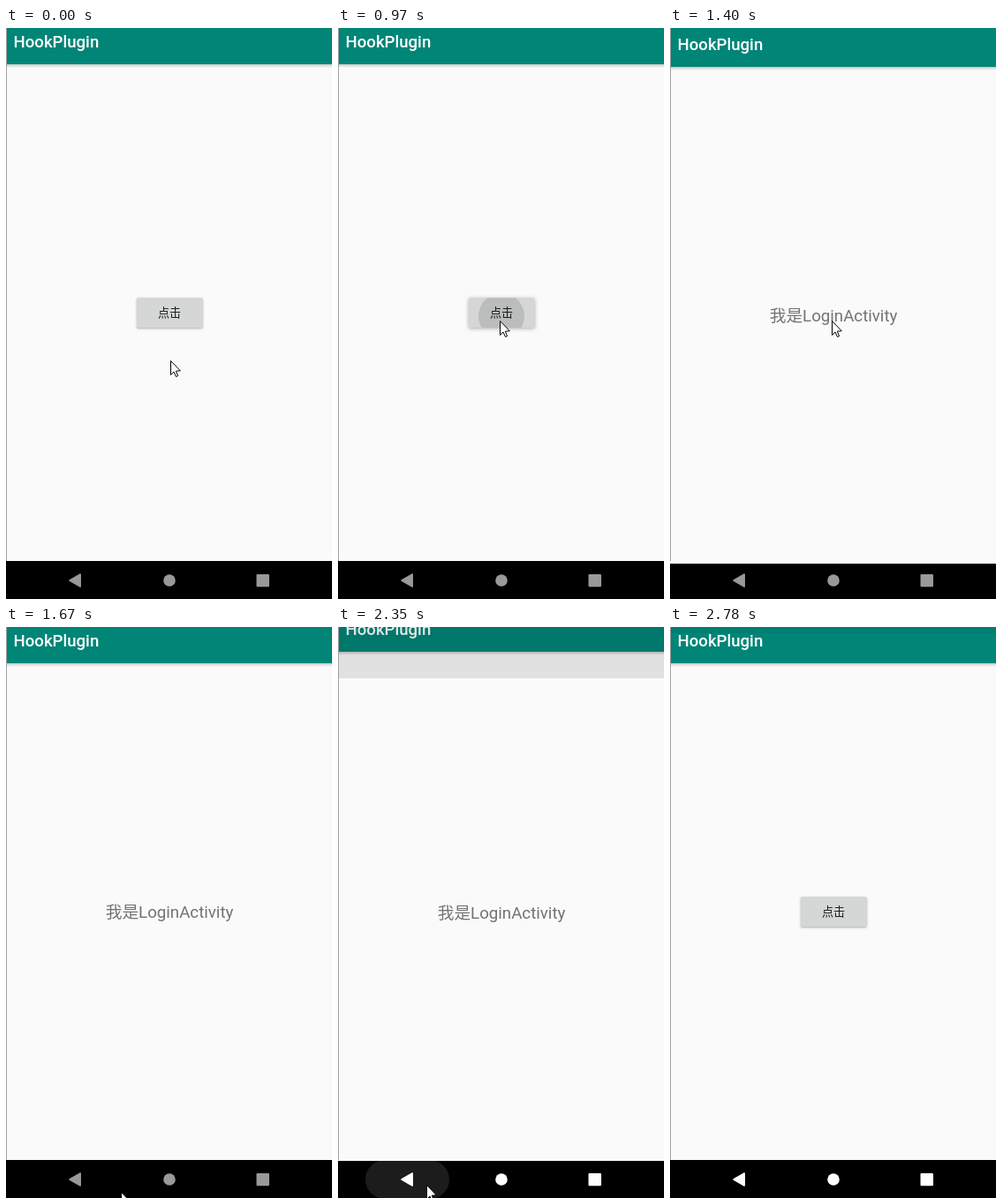
These frames come from a looping animation (369 by 646 pixels, 3.03 s). An HTML page with a canvas:

```html
<!DOCTYPE html>
<html lang="zh-CN">
<head>
<meta charset="utf-8">
<title>HookPlugin</title>
<style>
  html, body { margin: 0; width: 100%; height: 100%; overflow: hidden; background: #000; }
  canvas { display: block; }
</style>
</head>
<body>
<canvas id="stage" width="369" height="646"></canvas>
<script>
const ctx = document.getElementById('stage').getContext('2d');
const W = 369, H = 646, LOOP = 3030;
const BAR_BOTTOM = 41, NAV_TOP = 603;
const FONTS = 'Roboto, "Noto Sans CJK SC", "Noto Sans CJK", sans-serif';

// Each step changes part of the state and holds until the next one.
// home: vertical shift and dimming; login: vertical shift and top of its visible part.
const steps = [
  [0, { mouse: [186, 376], home: [0, 0], login: null, ripple: 0, icons: '#999', pill: null, topDim: 0 }],
  [120, { mouse: [187, 368] }],
  [240, { mouse: [188, 360] }],
  [390, { mouse: [186, 345] }],
  [520, { mouse: [183, 331] }],
  [970, { ripple: 26 }],
  [1100, { ripple: 80 }],
  [1250, { home: [-7, 0.1], login: [13, 49], ripple: 0 }],
  [1400, { home: [-12, 0.1], login: [3, 0] }],
  [1520, { login: [0, 0], mouse: [184, 444] }],
  [1670, { mouse: [130, 639] }],
  [1800, { mouse: [96, 640] }],
  [1920, { mouse: [74, 634] }],
  [2070, { mouse: [73, 630] }],
  [2220, { icons: '#fff', pill: [78, '#1c1c1c'] }],
  [2350, { home: [-13, 0.1], login: [1, 58], mouse: [100, 631], pill: [95, '#1c1c1c'] }],
  [2500, { home: [-7, 0.085], login: [14, 561], mouse: null, pill: [94, '#101010'] }],
  [2630, { home: [-1, 0.05], login: null, pill: null }],
  [2780, { home: [0, 0], topDim: 0.05 }]
];

function stateAt(time) {
  const passed = steps.filter(([start]) => start <= time);
  return Object.assign({}, ...passed.map(([, change]) => change));
}

function rect(x, y, w, h, color) {
  ctx.fillStyle = color;
  ctx.fillRect(x, y, w, h);
}

function roundRect(x, y, w, h, radius, color) {
  ctx.beginPath();
  ctx.roundRect(x, y, w, h, radius);
  ctx.fillStyle = color;
  ctx.fill();
}

function polygon(points) {
  ctx.beginPath();
  points.forEach(([x, y]) => ctx.lineTo(x, y));
  ctx.closePath();
}

function text(string, x, y, style, color) {
  ctx.font = `${style} ${FONTS}`;
  ctx.fillStyle = color;
  ctx.fillText(string, x, y);
}

function drawNav({ icons, pill }) {
  rect(0, NAV_TOP, W, H - NAV_TOP, '#000');
  if (pill) roundRect(78.5 - pill[0] / 2, 603, pill[0], 44, 22, pill[1]);
  ctx.fillStyle = ctx.strokeStyle = icons;
  ctx.lineWidth = 1.5;
  ctx.lineJoin = 'round';
  polygon([[72, 625], [84.2, 618], [84.2, 632]]);
  ctx.fill();
  ctx.stroke();
  ctx.beginPath();
  ctx.arc(185, 625, 6.8, 0, 2 * Math.PI);
  ctx.fill();
  roundRect(283.5, 618, 14.5, 14.3, 1.2, icons);
}

function drawPage(shift, clipTop, dim, drawContent) {
  const bottom = NAV_TOP + Math.max(0, shift);
  ctx.save();
  ctx.beginPath();
  ctx.rect(0, clipTop, W, bottom - clipTop);
  ctx.clip();
  ctx.translate(0, shift);
  rect(0, 0, W, H, '#fafafa');
  const shadow = ctx.createLinearGradient(0, BAR_BOTTOM, 0, BAR_BOTTOM + 4);
  shadow.addColorStop(0, 'rgba(0,0,0,.2)');
  shadow.addColorStop(1, 'rgba(0,0,0,0)');
  rect(0, BAR_BOTTOM, W, 4, shadow);
  rect(0, -30, W, BAR_BOTTOM + 30, '#008577');
  text('HookPlugin', 8.5, 22, '500 18.6px', '#fff');
  drawContent();
  rect(0, -30, W, H + 60, `rgba(0,0,0,${dim})`);
  ctx.restore();
}

function drawButton(ripple) {
  ctx.save();
  ctx.shadowColor = 'rgba(0,0,0,.32)';
  ctx.shadowBlur = ripple ? 4 : 2.5;
  ctx.shadowOffsetY = 1;
  roundRect(148, 305.3, 74.6, 33.6, 1.5, '#d5d7d6');
  ctx.restore();
  if (ripple) {
    ctx.save();
    ctx.beginPath();
    ctx.roundRect(148, 305.3, 74.6, 33.6, 1.5);
    ctx.clip();
    ctx.beginPath();
    ctx.arc(185, 326, ripple, 0, 2 * Math.PI);
    ctx.fillStyle = 'rgba(0,0,0,.12)';
    ctx.fill();
    ctx.restore();
  }
  text('点击', 172, 327, '13.1px', 'rgba(0,0,0,.87)');
}

function drawMouse([x, y]) {
  ctx.save();
  ctx.translate(x, y);
  polygon([[.5, .5], [.5, 16.5], [4, 13], [6.5, 18.5], [8.6, 17.5], [6.3, 12.2], [11.3, 11.8]]);
  ctx.fillStyle = '#fff';
  ctx.strokeStyle = '#000';
  ctx.lineWidth = 1;
  ctx.lineJoin = 'miter';
  ctx.fill();
  ctx.stroke();
  ctx.restore();
}

function draw(time) {
  const state = stateAt(time);
  const [shift, dim] = state.home;
  drawNav(state);
  drawPage(shift, 0, dim, () => drawButton(state.ripple));
  if (state.login) {
    drawPage(...state.login, 0, () =>
      text('我是LoginActivity', 112.7, 329.3, '18.7px', 'rgba(0,0,0,.54)'));
  }
  rect(0, 0, W, 7, `rgba(0,0,0,${state.topDim})`);
  rect(0, 0, 1, NAV_TOP, '#a0a0a0');
  if (state.mouse) drawMouse(state.mouse);
}

const begin = performance.now();
function tick() {
  draw((performance.now() - begin) % LOOP);
  requestAnimationFrame(tick);
}
tick();
</script>
</body>
</html>
```
